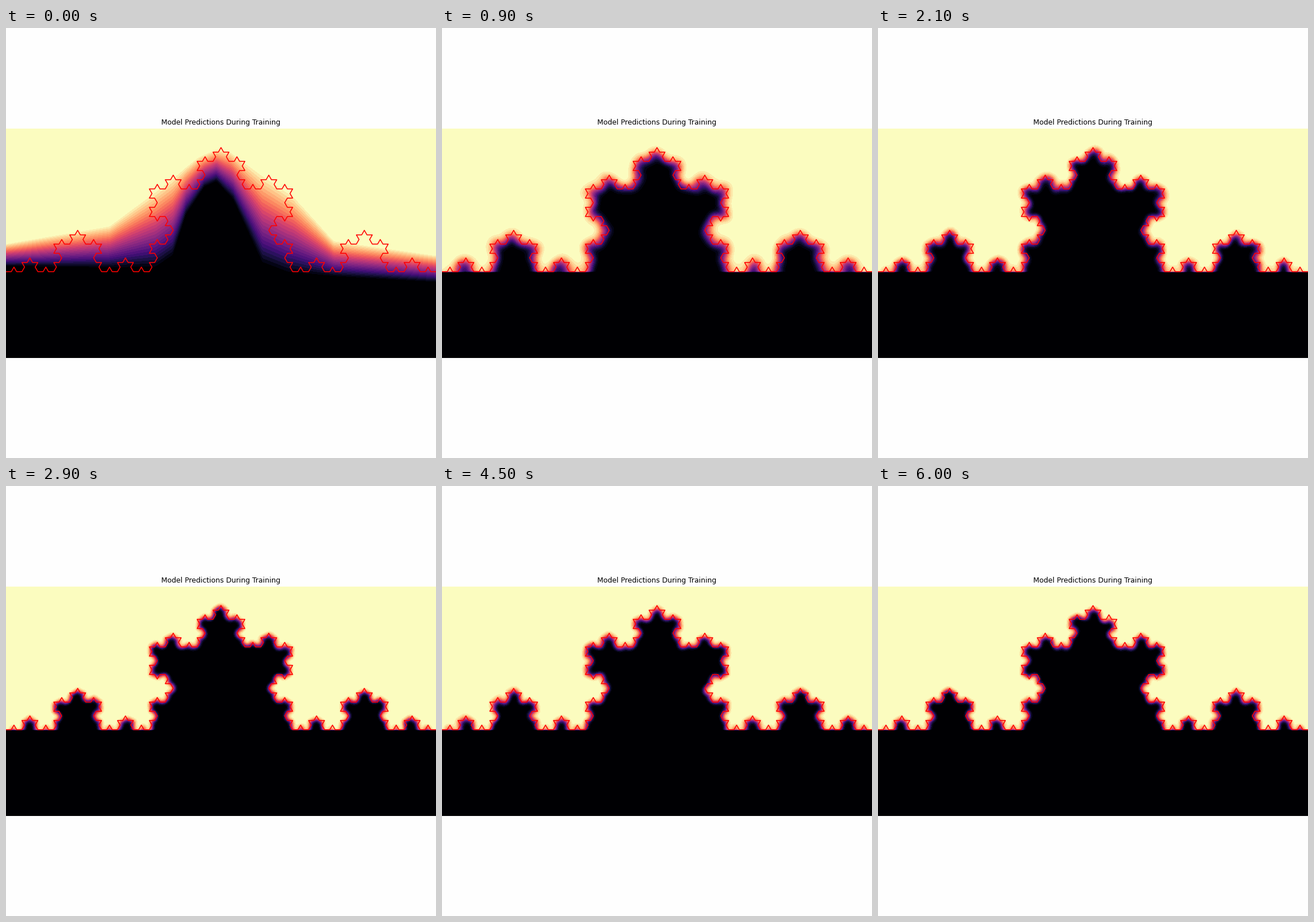
Recreate the animation shown at these times as a matplotlib script. Size 748 by 748 pixels, loop 6100 ms.

```python
import numpy as np
import matplotlib.pyplot as plt
from matplotlib.animation import FuncAnimation
from matplotlib.path import Path

SIZE = 748
TOP, BOTTOM = SIZE * 7 / 30, SIZE * 23 / 30   # plotted band, domain y in [-0.2, 1/3]
BASE = BOTTOM - 0.2 * SIZE                    # ground line of the curve
FRAMES, INTERVAL = 61, 100
COLS, ROWS = 374, 200
WARMUP = 5                                    # frames until the curve is found

cell_x, cell_y = SIZE / COLS, (BOTTOM - TOP) / ROWS
gx, gy = np.meshgrid((np.arange(COLS) + 0.5) * cell_x,
                     TOP + (np.arange(ROWS) + 0.5) * cell_y)
above = gy < BASE


def koch(order):
    """Vertices of the Koch curve in stage pixels."""
    z = np.array([0, 1], complex)
    for _ in range(order):
        a, d = z[:-1], np.diff(z) / 3
        tip = a + d + d * np.exp(1j * np.pi / 3)
        z = np.append(np.column_stack([a, a + d, tip, a + 2 * d]).ravel(), z[-1])
    return z.real * SIZE, BASE - z.imag * SIZE


def logit(p, eps):
    p = np.clip(p, eps, 1 - eps)
    return np.log(p / (1 - p))


curve = koch(4)
inside = Path(np.column_stack(curve)).contains_points(
    np.column_stack([gx.ravel(), gy.ravel()])).reshape(gx.shape)

# Spectra of the sky region and of everything above ground, for blurring
sky_spec = np.fft.rfft2(above & ~inside)
above_spec = np.fft.rfft2(above)
freq2 = ((np.fft.fftfreq(ROWS, cell_y)[:, None]) ** 2
         + np.fft.rfftfreq(COLS, cell_x)[None, :] ** 2)


def fitted(sigma):
    """Class logits of a fit that resolves the curve down to sigma pixels;
    blurring only above the ground keeps the ground line sharp."""
    kernel = np.exp(-2 * np.pi ** 2 * sigma ** 2 * freq2)
    sky = np.fft.irfft2(sky_spec * kernel, gx.shape)
    area = np.fft.irfft2(above_spec * kernel, gx.shape)
    p = np.where(above, sky / np.maximum(area, 1e-6), 0)
    return 1.2 * logit(p, 0.004)


def first_guess():
    """A soft bell between a dark lower edge and a light upper edge."""
    low = np.interp(gx, [0, 260, 290, 313, 345, 366, 395, 423, 446, 490, SIZE],
                    [415, 420, 400, 327, 278, 268, 300, 362, 413, 429, 443])
    high = np.interp(gx, [0, 180, 335, 366, 390, 500, 570, SIZE],
                     [374, 342, 222, 209, 213, 288, 368, 394])
    return logit((low - gy) / (low - high), 0.01)


def ripple(rng):
    """Smooth random field of about unit size."""
    total = np.zeros(gx.shape)
    for _ in range(3):
        kx, ky = rng.uniform(0.02, 0.07, 2) * rng.choice([-1, 1], 2)
        total += np.sin(kx * gx + ky * gy + rng.uniform(0, 2 * np.pi))
    return total / 1.7


def sample(field, x, y):
    """Bilinear lookup at stage positions."""
    u = np.clip(x / cell_x - 0.5, 0, COLS - 1.001)
    v = np.clip((y - TOP) / cell_y - 0.5, 0, ROWS - 1.001)
    i, j = u.astype(int), v.astype(int)
    u, v = u - i, v - j
    upper = field[j, i] * (1 - u) + field[j, i + 1] * u
    lower = field[j + 1, i] * (1 - u) + field[j + 1, i + 1] * u
    return upper * (1 - v) + lower * v


start = first_guess()
calm = np.clip((BASE - gy) / 60, 0.1, 1)      # keeps the ground steady


def prediction(frame):
    rng = np.random.default_rng(frame)
    left = max(0, 1 - frame / WARMUP)
    mix = 1 - left ** 2
    early = np.exp(-frame / 9)
    sigma = (4.6 + 8 * early) * rng.uniform(0.85, 1.15)
    field = start * (1 - mix) + fitted(sigma) * mix
    if frame:
        amp = 2 + 2 * early
        field = sample(field, gx + amp * ripple(rng), gy + amp * calm * ripple(rng))
        field += 0.4 * ripple(rng)
    return 1 / (1 + np.exp(-field))


fig = plt.figure(figsize=(10, 10), dpi=SIZE / 10, facecolor="#fefefe")
ax = fig.add_axes([0, 0, 1, 1])
ax.axis("off")
image = ax.imshow(prediction(0), cmap=plt.get_cmap("magma", 25), vmin=0, vmax=1,
                  extent=(0, SIZE, np.ceil(BOTTOM), np.ceil(TOP)), aspect="auto",
                  interpolation="bilinear", interpolation_stage="data")
ax.plot(*curve, color="red", lw=1.5)
ax.text(SIZE / 2, TOP - 6 * SIZE / 720, "Model Predictions During Training",
        ha="center", va="baseline", fontsize=11.93, family="DejaVu Sans")
ax.set_xlim(0, SIZE)
ax.set_ylim(SIZE, 0)


def update(frame):
    image.set_data(prediction(frame))
    return [image]


anim = FuncAnimation(fig, update, frames=FRAMES, interval=INTERVAL,
                     repeat=True, repeat_delay=0)
plt.show()
```
